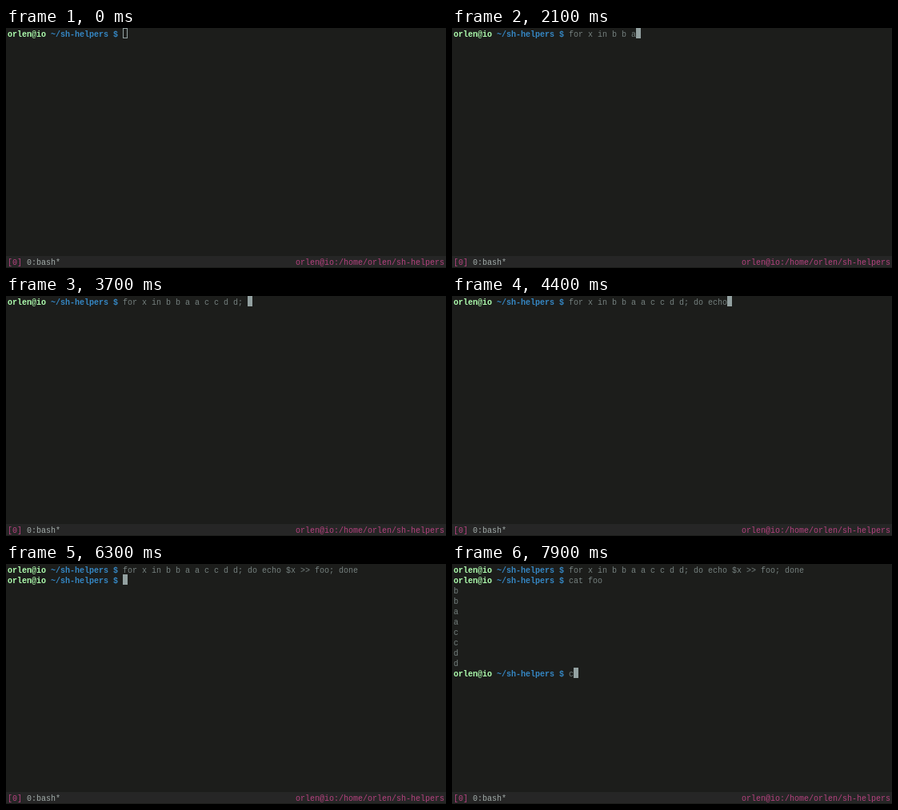
Write an HTML page that moves like this. It is 550x301 px and loops after 8 s.

```html
<!DOCTYPE html>
<html lang="en">
<head>
<meta charset="utf-8">
<title>Terminal session</title>
<style>
  html, body { margin: 0; width: 100%; height: 100%; overflow: hidden; background: #1c1d1b; }
  #stage { position: relative; width: 550px; height: 301px; overflow: hidden; background: #1c1d1b; }
  pre { margin: 0; position: absolute; top: 2px; font: 10px/13px "Liberation Mono", monospace; color: #75807f; }
  #screen { left: 2px; }
  #screen .user { color: #afffaf; }
  #screen .path { color: #3587c4; }
  #cursor { position: absolute; width: 6px; height: 13px; box-sizing: border-box; border: 1px solid #93a1a1; }
  #bar { position: absolute; left: 0; top: 286px; width: 550px; height: 14px; background: #262626; }
  #bar pre { color: #b5427f; }
  #bar i { font-style: normal; color: #a3adab; }
  #left { left: 2px; }
  #right { right: 2px; }
</style>
</head>
<body>
<div id="stage">
  <div id="cursor"></div>
  <pre id="screen"></pre>
  <div id="bar">
    <pre id="left">[0] <i>0:bash*</i></pre>
    <pre id="right">orlen@io:/home/orlen/sh-helpers</pre>
  </div>
</div>
<script>
const LOOP = 8000, KEY = 100, CELL = 6, ROW = 13, PROMPT_COLS = 24;
const PROMPT = '<b class="user">orlen@io</b> <b class="path">~/sh-helpers $</b> ';

// keys: bursts of typing as [start ms, key count], one key per 100 ms
const commands = [
  { shown: 0, text: 'for x in b b a a c c d d; do echo $x >> foo; done', output: [],
    keys: [[500, 3], [900, 1], [1100, 5], [1700, 7], [2500, 6], [3300, 4], [3800, 9], [4800, 5], [5400, 9]] },
  { shown: 6300, text: 'cat foo', output: [...'bbaaccdd'], keys: [[6400, 6], [7200, 1]] },
  { shown: 7400, text: 'c', output: [], keys: [[7900, 1]] }
];

const screen = document.getElementById('screen');
const cursor = document.getElementById('cursor');
const escapeText = s => s.replace(/>/g, '&gt;');

const typedCount = (keys, t) => keys.reduce((sum, [start, count]) =>
  sum + Math.max(0, Math.min(count, Math.floor((t - start) / KEY) + 1)), 0);

function render(t) {
  const lines = [];
  let column = 0;
  commands.forEach(({ shown, text, output, keys }, i) => {
    if (t < shown) return;
    const next = commands[i + 1];
    column = typedCount(keys, t);
    lines.push(PROMPT + escapeText(text.slice(0, column)));
    if (next && t >= next.shown) lines.push(...output);
  });
  const html = lines.join('\n');
  if (screen.dataset.html !== html) screen.innerHTML = screen.dataset.html = html;
  cursor.style.left = 2 + (PROMPT_COLS + column) * CELL + 'px';
  cursor.style.top = (lines.length - 1) * ROW + 'px';
  cursor.style.background = t < 100 ? 'none' : '#93a1a1';
}

function tick() {
  render(performance.now() % LOOP);
  requestAnimationFrame(tick);
}
tick();
</script>
</body>
</html>
```
